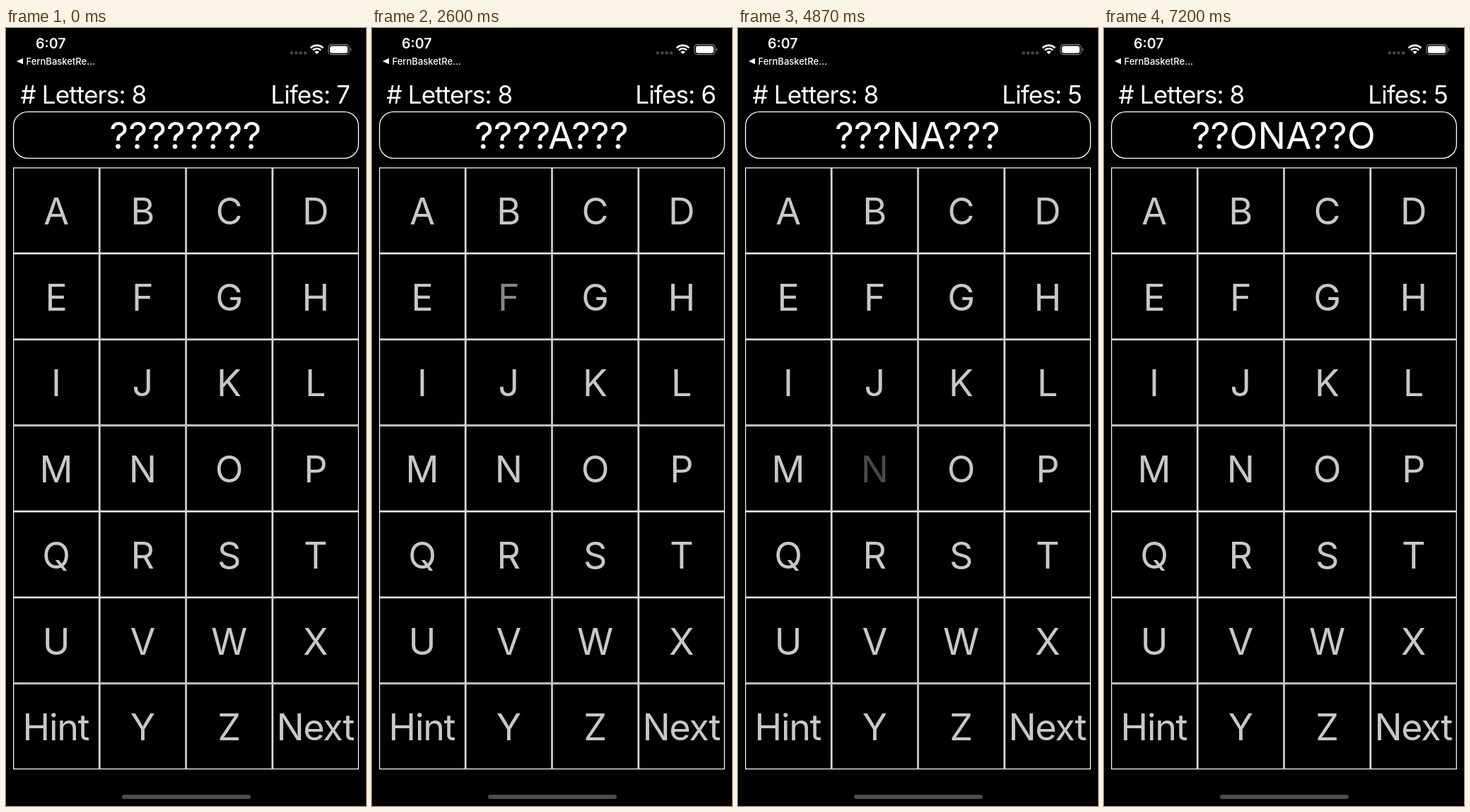
An HTML page with a canvas that plays this animation: 509 px wide and 1101 px high, repeating every 8000 ms.

```html
<!DOCTYPE html>
<html lang="en">
<head>
<meta charset="utf-8">
<title>Word guessing game</title>
<style>
  html, body { margin: 0; height: 100%; overflow: hidden; background: #000; }
  canvas { display: block; }
</style>
</head>
<body>
<canvas id="stage" width="509" height="1101"></canvas>
<script>
const ctx = document.getElementById('stage').getContext('2d');
const LOOP = 8000, FADE = 520;
const KEY_GRAY = 200, PRESSED_GRAY = 72;
const KEYS = [...'ABCDEFGHIJKLMNOPQRSTUVWX', 'Hint', 'Y', 'Z', 'Next'];
const CELL = { x: 10, y: 197.3, w: 122.25, h: 121.7 };

// Each tap dims its key at once; on release the game updates and the key fades back.
const TAPS = [
  { key: 'A', down: 780, up: 840, word: '????A???', lives: 7 },
  { key: 'F', down: 2270, up: 2350, word: '????A???', lives: 6 },
  { key: 'P', down: 3630, up: 3830, word: '????A???', lives: 5 },
  { key: 'N', down: 4740, up: 4865, word: '???NA???', lives: 5 },
  { key: 'O', down: 6550, up: 6620, word: '??ONA??O', lives: 5 }
];

function text(str, x, y, size, { align = 'left', weight = 400, color = '#fff', spacing = 0 } = {}) {
  ctx.font = `${weight} ${size}px Inter, sans-serif`;
  ctx.letterSpacing = `${spacing}px`;
  ctx.textAlign = align;
  ctx.fillStyle = color;
  ctx.fillText(str, x, y);
}

function roundBox(x, y, w, h, r, fill, stroke, width = 1.3) {
  ctx.beginPath();
  ctx.roundRect(x, y, w, h, r);
  if (fill) { ctx.fillStyle = fill; ctx.fill(); }
  if (stroke) { ctx.strokeStyle = stroke; ctx.lineWidth = width; ctx.stroke(); }
}

function drawStatusBar() {
  text('6:07', 42, 29, 19.5, { weight: 600 });
  ctx.beginPath();
  ctx.moveTo(15, 47);
  ctx.lineTo(24, 42.8);
  ctx.lineTo(24, 51.2);
  ctx.fill();
  text('FernBasketRe...', 28.5, 51.5, 13, { weight: 500 });

  for (let i = 0; i < 4; i++) roundBox(401.5 + i * 6.4, 33, 4.6, 4.6, 2, '#444');

  // Wi-Fi fan: a wedge and two arcs around one point
  const wedge = [-Math.PI * 0.75, -Math.PI * 0.25];
  ctx.fillStyle = ctx.strokeStyle = '#fff';
  ctx.lineWidth = 2.6;
  ctx.beginPath();
  ctx.moveTo(439.5, 37);
  ctx.arc(439.5, 37, 4.6, ...wedge);
  ctx.fill();
  for (const r of [8, 12.4]) {
    ctx.beginPath();
    ctx.arc(439.5, 37, r, ...wedge);
    ctx.stroke();
  }

  roundBox(456, 23.5, 29, 14, 4, null, '#777');
  roundBox(458, 25.5, 25, 10, 2.5, '#fff');
  roundBox(486.7, 28.3, 1.7, 4.4, [0, 2, 2, 0], '#777');
}

function keyGray(key, t) {
  const tap = TAPS.find(p => p.key === key && t >= p.down);
  if (!tap) return KEY_GRAY;
  const back = Math.min(1, Math.max(0, (t - tap.up) / FADE));
  return Math.round(PRESSED_GRAY + (KEY_GRAY - PRESSED_GRAY) * back);
}

function drawKeys(t) {
  const { x, y, w, h } = CELL;
  ctx.strokeStyle = '#f4f4f0';
  ctx.lineWidth = 1.3;
  KEYS.forEach((key, i) => {
    const left = x + (i % 4) * w, top = y + Math.floor(i / 4) * h;
    ctx.strokeRect(left + 0.65, top + 0.65, w - 1.3, h - 1.3);
    const g = keyGray(key, t);
    text(key, left + w / 2 - 0.7, top + 80.7, 52,
      { align: 'center', color: `rgb(${g},${g},${g})`, spacing: -1.3 });
  });
}

function draw(now) {
  const t = now % LOOP;
  const { word, lives } = TAPS.filter(p => t >= p.up).pop() || { word: '????????', lives: 7 };
  ctx.fillStyle = '#000';
  ctx.fillRect(0, 0, 509, 1101);

  drawStatusBar();
  text('# Letters: 8', 20.5, 106.5, 35, { spacing: -0.88 });
  text(`Lifes: ${lives}`, 486, 106.5, 35, { align: 'right', spacing: -0.88 });
  roundBox(10.6, 118.6, 487.8, 65.8, 20, null, '#fff');
  text(word, 253.7, 171, 52.5, { align: 'center' });
  drawKeys(t);
  roundBox(164, 1085, 182, 6, 3, '#4d4d4d');

  requestAnimationFrame(draw);
}
requestAnimationFrame(draw);
</script>
</body>
</html>
```
